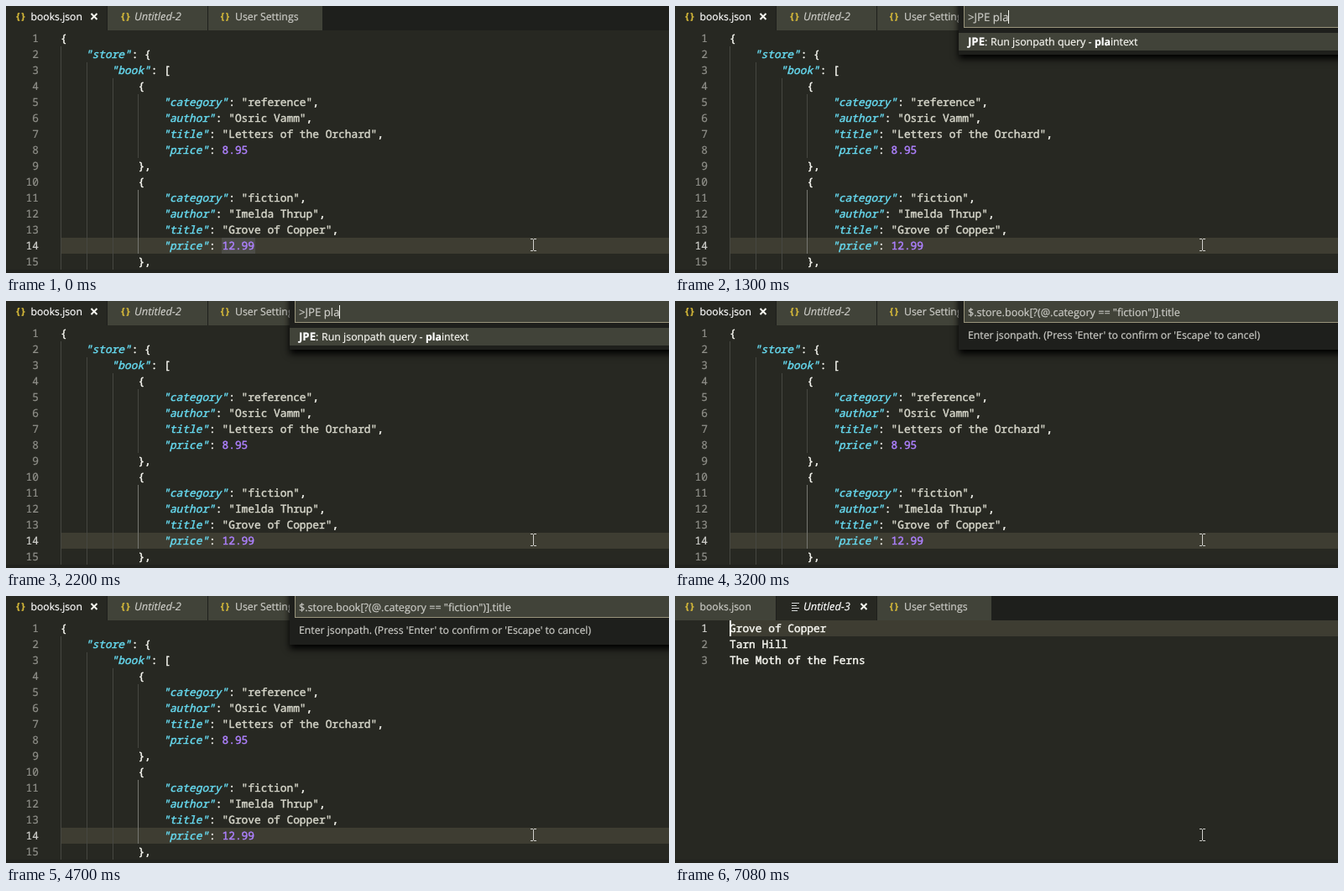
These frames come from a looping animation (790 px wide and 318 px high, 8000 ms). An HTML page with a canvas:

```html
<!DOCTYPE html>
<html lang="en">
<head>
<meta charset="utf-8">
<title>JSON path query</title>
<style>
html, body { margin: 0; width: 100%; height: 100%; overflow: hidden; background: #272822; }
canvas { display: block; }
</style>
</head>
<body>
<canvas id="stage" width="790" height="318"></canvas>
<script>
const ctx = document.getElementById('stage').getContext('2d');
const LOOP = 8000, COL = 7.7, ROW = 19, LEFT = 65, TOP = 29;
const MONO = '"Noto Sans Mono", "DejaVu Sans Mono", monospace';
const UI = '"Open Sans", "Noto Sans", sans-serif';
const CODE = '12.83px ' + MONO;
const BG = '#272822', BAR = '#1e1f1c', RAISED = '#414339', BAND = '#3e3d32';
const WHITE = '#f8f8f2', SOFT = '#ccccc7';

const source = `{
    "store": {
        "book": [
            {
                "category": "reference",
                "author": "Osric Vamm",
                "title": "Letters of the Orchard",
                "price": 8.95
            },
            {
                "category": "fiction",
                "author": "Imelda Thrup",
                "title": "Grove of Copper",
                "price": 12.99
            },`.split('\n');
const results = ['Grove of Copper', 'Tarn Hill', 'The Moth of the Ferns'];

function rect(x, y, w, h, color) {
  ctx.fillStyle = color;
  ctx.fillRect(x, y, w, h);
}

// Draws text on a baseline, thickened by a fine outline, and returns the x where it ends.
function text(s, x, y, font, color, outline = 0.2) {
  ctx.font = font;
  ctx.fillStyle = ctx.strokeStyle = color;
  ctx.lineWidth = outline;
  ctx.fillText(s, x, y);
  ctx.strokeText(s, x, y);
  return x + ctx.measureText(s).width;
}

const rowTop = i => TOP + ROW * i;
const ui = (s, x, y, color, size = 12.3, style = '') =>
  text(s, x, y, `${style} ${size}px ${UI}`, color);

function code(s, col, row, color, style = '') {
  const x = LEFT + col * COL - (style ? 1 : 0);
  text(s, x, rowTop(row) + 14, `${style} ${CODE}`, color, 0.45);
}

function lineNumbers(count, active) {
  ctx.textAlign = 'right';
  for (let i = 0; i < count; i++)
    text(i + 1, 39, rowTop(i) + 14, CODE, i === active ? '#d2d2ce' : '#90908a');
  ctx.textAlign = 'left';
}

function braces(x) {
  text('{', x, 16, 'bold 11px ' + MONO, '#d8bb3a');
  text('}', x + 6.3, 16, 'bold 11px ' + MONO, '#d8bb3a');
}

function closeMark(x) {
  ctx.strokeStyle = WHITE;
  ctx.lineWidth = 2;
  ctx.beginPath();
  ctx.moveTo(x, 9); ctx.lineTo(x + 7, 16);
  ctx.moveTo(x + 7, 9); ctx.lineTo(x, 16);
  ctx.stroke();
}

function tabs(done) {
  rect(0, 0, 790, TOP, BAR);
  rect(0, 0, 120, TOP, done ? RAISED : BG);
  rect(121, 0, 119, TOP, done ? BG : RAISED);
  rect(241, 0, 136, TOP, RAISED);
  braces(11);
  ui('books.json', 29.5, 17, done ? SOFT : '#fff', 12.2);
  ui(done ? 'Untitled-3' : 'Untitled-2', 153, 17, done ? '#fff' : SOFT, 12.9, 'italic');
  braces(254.5);
  ui('User Settings', 273, 17, SOFT);
  if (done) {
    [9, 6, 9, 7].forEach((w, i) => rect(139, 8 + 3 * i, w, 1, '#d4d7d6'));
    closeMark(221.5);
  } else {
    braces(136);
    closeMark(101.5);
  }
}

function guide(level, from, to, color = '#464741') {
  rect(LEFT + Math.round(level * 4 * COL), rowTop(from), 1, ROW * (to - from), color);
}

function jsonEditor(focused) {
  rect(LEFT, rowTop(13), 725, ROW, BAND);
  if (focused) rect(257, rowTop(13), 40, ROW, '#4c4c47');
  guide(0, 1, 15);
  guide(1, 2, 15);
  guide(2, 3, 15);
  guide(3, 4, 8);
  guide(3, 10, 14, '#767771');
  lineNumbers(15, 13);
  source.forEach((line, row) => {
    for (const { 0: token, index } of line.matchAll(/"[^"]*"|[\d.]+|\S/g)) {
      const isKey = line[index + token.length] === ':';
      if (isKey) code(token, index, row, '#66d9ef', 'italic');
      else code(token, index, row, token[0] === '"' ? '#d6d6ca' : /\d/.test(token) ? '#ae81ff' : WHITE);
    }
  });
}

function resultEditor() {
  rect(LEFT, TOP, 725, ROW, BAND);
  lineNumbers(3, 0);
  results.forEach((s, row) => code(s, 0, row, WHITE));
  rect(LEFT, TOP, 2, ROW, WHITE);
}

function caret(x) {
  rect(x, 5, 1, 16, WHITE);
}

function command(typed) {
  rect(338, 32, 452, 21, RAISED);
  ui('>JPE ' + typed, 349, 18, SOFT, 13.2);
  caret(typed.length > 1 ? 397 : 388);
  const colon = ui('JPE', 349, 47, '#fff', 13.2, 'bold');
  ui(':', colon, 47, WHITE);
  ui('Run jsonpath query -', 376, 47, WHITE, 12.4);
  const rest = ui(typed, 500, 47, '#fff', 12.3, 'bold');
  ui('plaintext'.slice(typed.length), rest, 47, WHITE);
}

function prompt(query) {
  if (query) ui(query, 349, 18, SOFT, 12.6);
  else caret(349);
  ui("Enter jsonpath. (Press 'Enter' to confirm or 'Escape' to cancel)", 349, 45, SOFT, 12.26);
}

function palette(t) {
  ctx.save();
  ctx.shadowColor = '#000';
  ctx.shadowBlur = 8;
  ctx.shadowOffsetY = 5;
  rect(338, -20, 470, 78, BAR);
  ctx.restore();
  rect(344, 0, 446, 26, '#99947c');
  rect(345, 0, 445, 25, RAISED);
  if (t < 1300) command('p');
  else if (t < 2800) command('pla');
  else prompt(t < 3200 ? '' : '$.store.book[?(@.category == "fiction")].title');
}

function mouse() {
  rect(628, 278, 1, 13, '#d0d0cc');
  for (const y of [277, 291]) {
    rect(625, y, 3, 1, '#d0d0cc');
    rect(629, y, 3, 1, '#d0d0cc');
  }
}

function draw(t) {
  const done = t >= 5700;
  ctx.textRendering = 'geometricPrecision';
  ctx.lineJoin = 'round';
  rect(0, 0, 790, 318, BG);
  tabs(done);
  if (done) resultEditor();
  else jsonEditor(t < 1000);
  rect(0, 314, 790, 4, '#22231e');
  if (t >= 1000 && !done) palette(t);
  mouse();
}

const start = performance.now();
function tick() {
  draw((performance.now() - start) % LOOP);
  requestAnimationFrame(tick);
}
tick();
</script>
</body>
</html>
```
